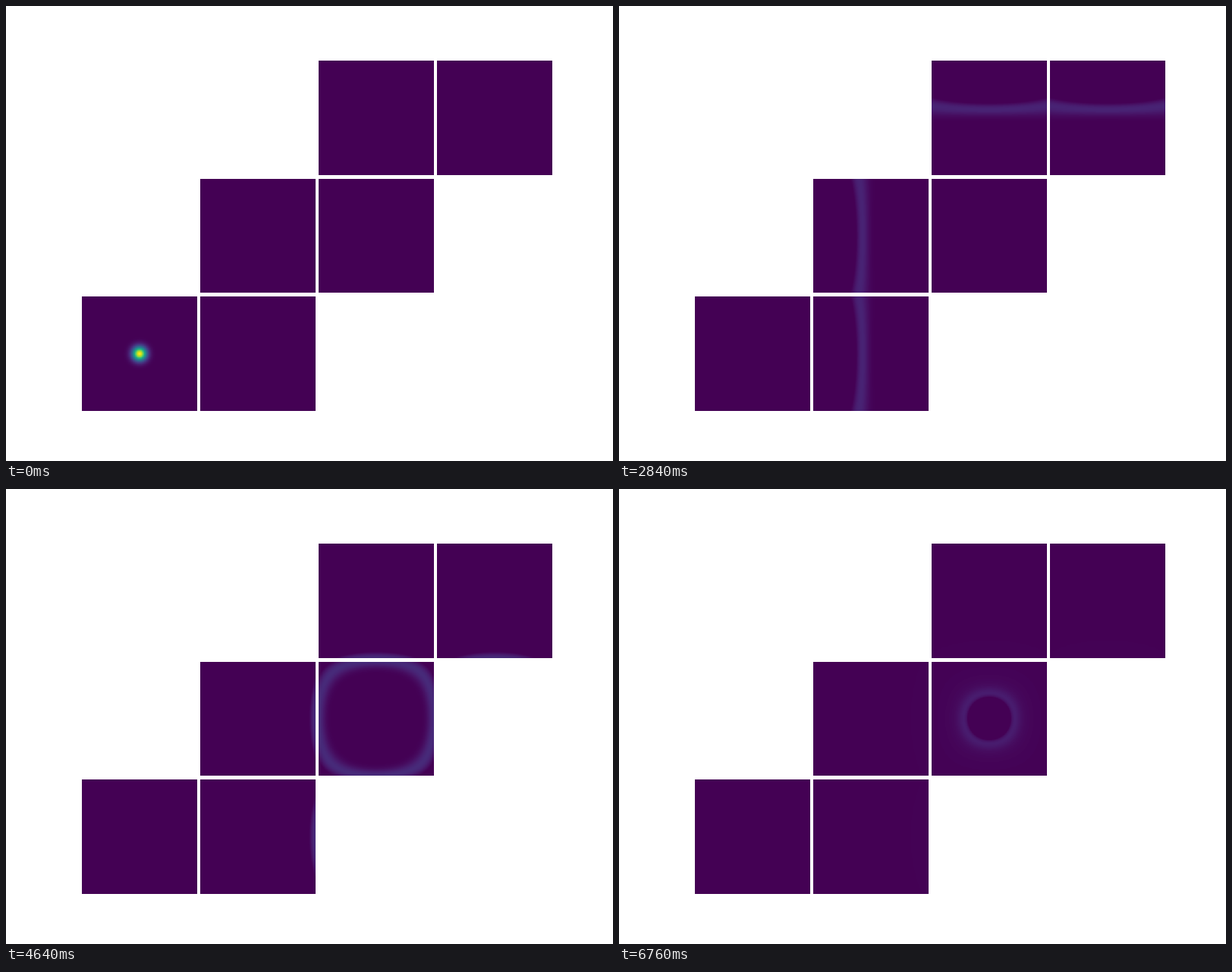
These frames come from a looping animation (800 by 600 pixels, 6840 ms). A matplotlib script:

```python
import numpy as np
import matplotlib.pyplot as plt
from matplotlib.animation import FuncAnimation

# Wave equation on a unit sphere, shown on the six faces of an equiangular cube
FRAMES, INTERVAL = 171, 40
STEP = 0.02      # radians travelled per frame
WIDTH = 0.095    # radius of the initial Gaussian bump
N = 100          # cells along a face edge
L_MAX = 120      # highest Legendre degree

degree = np.arange(L_MAX + 1)
k = degree + 0.5
coef = k * WIDTH**2 / 2 * np.exp(-(k * WIDTH)**2 / 4)
omega = np.sqrt(degree * (degree + 1))

theta = np.linspace(0, np.pi, 1500)
modes = np.polynomial.legendre.legvander(np.cos(theta), L_MAX)

angle = ((np.arange(N) + 0.5) / N - 0.5) * np.pi / 2
x, y = np.meshgrid(np.tan(angle), np.tan(angle))
r = np.sqrt(1 + x**2 + y**2)

# (row, column, cosine of the distance from the bump)
faces = [
    (2, 0, 1 / r),
    (2, 1, -x / r),
    (1, 1, -x / r),
    (1, 2, -1 / r),
    (0, 2, y / r),
    (0, 3, y / r),
]


def wave(i):
    """Height along the polar angle at frame i."""
    return modes @ (coef * np.cos(omega * STEP * i))


fig = plt.figure(figsize=(8, 6), dpi=100, facecolor="white")
grid = fig.add_gridspec(3, 4, left=0.125, right=0.9, bottom=0.11, top=0.88,
                        wspace=0.03, hspace=0.03)

panels = []
for row, col, cosine in faces:
    ax = fig.add_subplot(grid[row, col])
    ax.axis("off")
    image = ax.imshow(np.zeros((N, N)), origin="lower", aspect="auto",
                      cmap="viridis", vmin=0, vmax=1)
    panels.append((image, np.arccos(cosine)))


def update(i):
    height = wave(i)
    for image, dist in panels:
        image.set_data(np.interp(dist, theta, height))
    return [image for image, _ in panels]


anim = FuncAnimation(fig, update, frames=FRAMES, interval=INTERVAL,
                     repeat=True, repeat_delay=0, blit=False)
plt.show()
```
